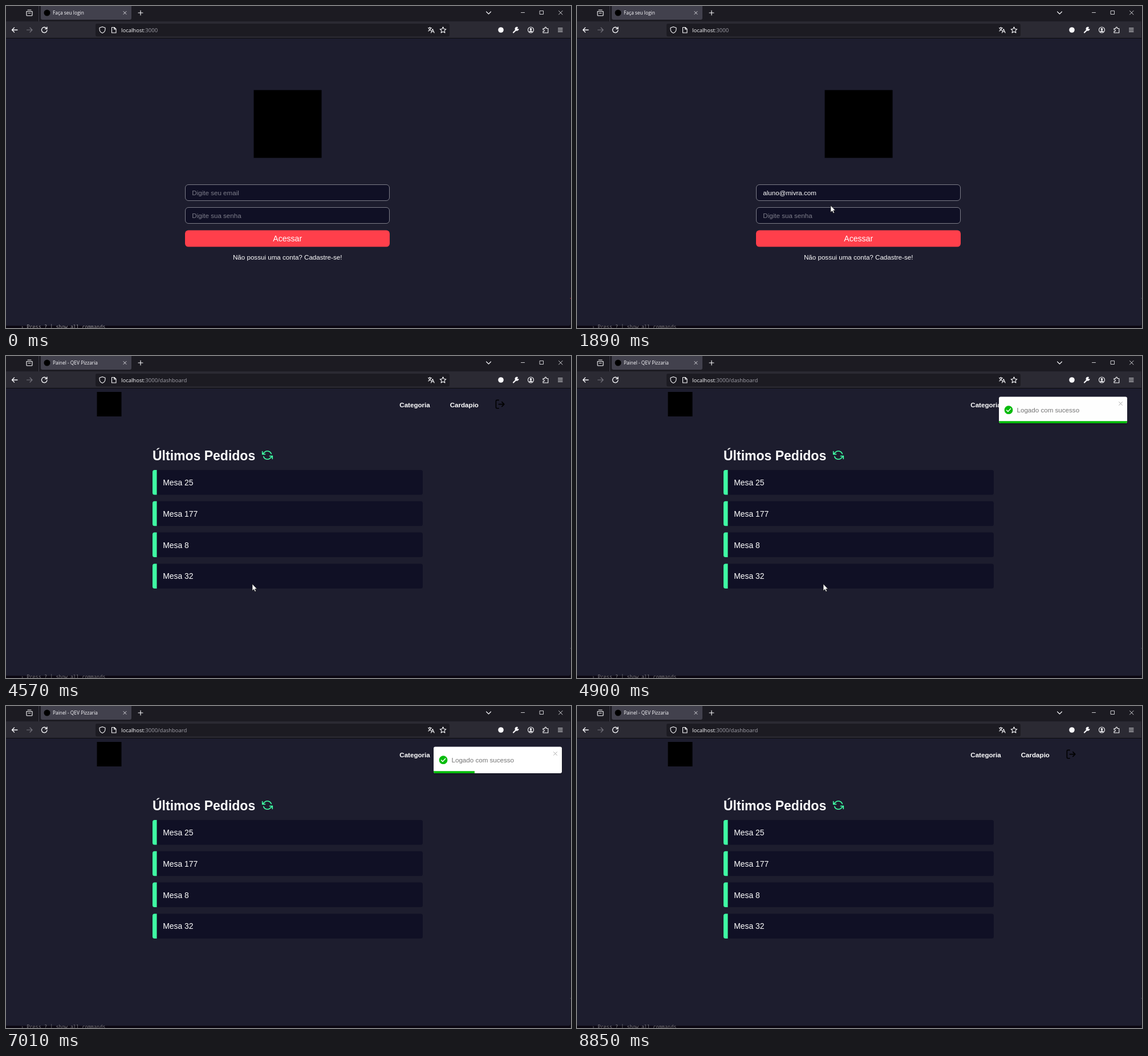
Write an HTML page that moves like this. It is 991 px wide and 565 px high and loops after 8920 ms.

```html
<!DOCTYPE html>
<html lang="pt-BR">
<head>
<meta charset="utf-8">
<title>Login</title>
<style>
html, body { margin: 0; width: 100%; height: 100%; overflow: hidden; background: #0b0711; }
svg { display: block; width: 991px; height: 565px; font: 11.6px "Liberation Sans", Arial, sans-serif; }
text { white-space: pre; }
.ui { font-family: "Open Sans", "Noto Sans", sans-serif; }
.line { fill: none; stroke: #fbfbfe; stroke-linecap: round; stroke-linejoin: round; }
.box { fill: #101025; stroke: #7c7c87; }
.white { fill: #fff; }
.hint { fill: #7d7d8a; }
.mid { text-anchor: middle; }
.bold { font-weight: bold; }
</style>
</head>
<body>
<svg viewBox="0 0 991 565">
  <rect width="991" height="565" fill="#0b0711"/>
  <path d="M990.5 0V565" stroke="#17131d"/>
  <path d="M0 56H990V558q0 3-3 3H0z" fill="#1d1d2e"/>
  <text id="shell" x="26" y="565.7" style="font:8.5px 'DejaVu Sans Mono',monospace">› Press ? │ show all commands</text>
  <path id="tick" d="M989.5 513h1.5"/>

  <g id="login">
    <rect x="434.5" y="147.5" width="119" height="119"/>
    <rect class="box" x="314.5" y="313.5" width="358" height="28" rx="5.5"/>
    <rect class="box" x="314.5" y="353.5" width="358" height="28" rx="5.5"/>
    <text id="email" x="326.3" y="332"></text>
    <text id="hint" class="hint" x="326.3" y="372">Digite sua senha</text>
    <g id="dots" class="white"></g>
    <path id="caret" stroke="#fff"/>
    <rect x="314" y="393.6" width="359" height="29" rx="5.8" fill="#ff3f4b"/>
    <text class="white mid" x="493.7" y="413.2" font-size="14.1">Acessar</text>
    <text class="white mid" x="493.7" y="445">Não possui uma conta? Cadastre-se!</text>
  </g>

  <g id="dash">
    <rect x="159.5" y="63" width="43" height="43"/>
    <g class="white bold">
      <text x="690.3" y="90.3">Categoria</text>
      <text x="778.7" y="90.3">Cardapio</text>
      <text x="257" y="182.8" font-size="23">Últimos Pedidos</text>
    </g>
    <path class="line" style="stroke:#000;stroke-width:2" transform="translate(857 75) scale(.8)"
      d="M9 21H5a2 2 0 0 1-2-2V5a2 2 0 0 1 2-2h4M16 17l5-5-5-5M21 12H9"/>
    <path class="line" style="stroke:#3fffa3;stroke-width:2" transform="translate(448.9 164.4) scale(.8)"
      d="M1 4v6h6M23 20v-6h-6M20.5 9A9 9 0 0 0 5.6 5.6L1 10M23 14l-4.6 4.4A9 9 0 0 1 3.5 15"/>
    <g id="orders"></g>
  </g>

  <g id="toast">
    <rect x="-1" y="72" width="227" height="49" rx="4" fill="#000" opacity=".12"/>
    <rect y="71.5" width="225" height="46.5" rx="3" fill="#fff"/>
    <circle cx="17" cy="94.7" r="7.4" fill="#07bc0c"/>
    <path class="line" style="stroke:#fff;stroke-width:1.5" d="M13.5 95l2.4 2.4 4.6-5"/>
    <text x="31.5" y="98.8" fill="#757575">Logado com sucesso</text>
    <path class="line" style="stroke:#aaa" d="M210.6 80.6l5.8 5.8m0-5.8l-5.8 5.8"/>
    <clipPath id="card"><rect y="71.5" width="225" height="46.5" rx="3"/></clipPath>
    <g clip-path="url(#card)"><rect id="bar" y="114.2" height="3.8" fill="#07bc0c"/></g>
  </g>

  <g id="chrome">
    <rect width="990" height="27" fill="#1c1b22"/>
    <rect y="27" width="990" height="29" fill="#2b2a33"/>
    <rect y="56" width="990" height="1" fill="#0c0c0f"/>
    <path d="M57.5 0V27" stroke="#3c3b46"/>
    <path d="M61 0H220V21q0 3-3 3H64q-3 0-3-3z" fill="#42414d"/>
    <rect x="157" y="31" width="621" height="22.5" rx="3" fill="#1c1b22"/>
    <circle cx="72" cy="12" r="5.5"/>
    <g class="ui" fill="#fbfbfe">
      <text id="title" x="82" y="15.3" font-size="8.4"></text>
      <text x="202" y="45.8" font-size="9.5">localhost<tspan id="path" fill="#a2a1aa"></tspan></text>
    </g>
    <g class="line" stroke-width="1.1">
      <path d="M38 7h6M36 9.5h10v6.5q0 1-1 1h-8q-1 0-1-1zM39 12.5h4"/>
      <path d="M232 12h8M236 8v8M842.5 10l4 4 4-4"/>
      <path d="M206 9.5l5 5m0-5l-5 5M903.5 11.5h6M936.5 8.5h6v6h-6zM969.5 8.5l6.5 6.5m0-6.5l-6.5 6.5" stroke-width=".8"/>
      <path d="M20 42h-9.5m4-4l-4 4 4 4" stroke-width="1.3"/>
      <path d="M36.5 42h9.5m-4-4l4 4-4 4" stroke="#77767f"/>
      <path d="M71.3 39.5A4.8 4.8 0 1 0 72 42.5M72 36.8v3.4h-3.4" stroke-width="1.3"/>
      <path d="M169 36.5l5 1.8v2.2q0 5-5 7-5-2-5-7v-2.2z"/>
      <path d="M185.5 37.5h4.5l3 3v6.5h-7.5zM189.7 37.5v3.3h3.3"/>
      <path d="M740.5 38.5h6m-3-1.5v1.5m2 0q-1 3.5-4.7 5.5m.8-4q1.5 2.5 4 3.3M745.5 47l2.8-6.5 2.8 6.5m-4.7-2h3.8"/>
      <path d="M766.5 36.8l1.6 3.5 3.8.4-2.9 2.5.9 3.8-3.4-2-3.4 2 .9-3.8-2.9-2.5 3.8-.4z"/>
      <path d="M890 46.5l4.5-4.5" stroke-width="2.2"/>
      <path d="M897.5 37.5a3 3 0 1 0 1.5 3l-2 .2-1-1.2z" fill="#fbfbfe"/>
      <circle cx="920.5" cy="42" r="5"/>
      <path d="M917.8 45q2.7-3 5.4 0z" fill="#fbfbfe"/>
      <circle cx="920.5" cy="40.7" r="1.3" fill="#fbfbfe"/>
      <path d="M942 39.5h3v-1a1.4 1.4 0 0 1 2.8 0v1h3v7.5h-8.8v-2.5h1a1.4 1.4 0 0 0 0-2.8h-1z"/>
      <path d="M968.5 39h7.5m-7.5 3h7.5m-7.5 3h7.5"/>
    </g>
    <circle cx="868" cy="42" r="4.8" fill="#fbfbfe"/>
  </g>

  <path id="arrow" d="M0 0V12L2.7 9.5 4.6 13.5 6.5 12.6 4.7 8.8H8.3z" fill="#fff" stroke="#111" stroke-width=".7"/>
  <path id="beam" class="line" d="M-2.5-5.5Q0-5.5 0-4.5Q0-5.5 2.5-5.5M0-5V5M-2.5 5.5Q0 5.5 0 4.5Q0 5.5 2.5 5.5"/>
</svg>
<script>
const LOOP = 8920, LOGGED_IN = 4500, TOAST_IN = 4525, BAR_START = 5227, TOAST_OUT = 7849;
const UNIT = 0.725; // page zoom
const $ = id => document.getElementById(id);
const set = (id, attrs) => { for (const k in attrs) $(id).setAttribute(k, attrs[k]); };
const show = (id, on) => set(id, { visibility: on ? 'visible' : 'hidden' });
const clamp = v => Math.min(1, Math.max(0, v));

const bezier = (x1, y1, x2, y2) => k => {
  const at = (s, p, q) => 3 * s * (1 - s) ** 2 * p + 3 * s * s * (1 - s) * q + s ** 3;
  let lo = 0, hi = 1;
  for (let i = 0; i < 22; i++) {
    const s = (lo + hi) / 2;
    if (at(s, x1, x2) < k) lo = s; else hi = s;
  }
  return at(lo, y1, y2);
};
const linear = k => k;
const bounce = bezier(.215, .61, .355, 1), ease = bezier(.25, .1, .25, 1);

// Interpolates rows of [time, ...values]
function track(rows, t, curve = linear) {
  if (t <= rows[0][0]) return rows[0].slice(1);
  const i = rows.findIndex(r => r[0] > t);
  if (i < 0) return rows[rows.length - 1].slice(1);
  const a = rows[i - 1], b = rows[i], k = curve((t - a[0]) / (b[0] - a[0]));
  return a.slice(1).map((v, j) => v + (b[j + 1] - v) * k);
}

const mouse = [
  [390, 800, 565], [1220, 470, 327], [1860, 470, 327], [1890, 445, 350],
  [2240, 423, 366], [3990, 423, 366], [4300, 432, 400], [5250, 432, 400],
  [5600, 741, 401], [5880, 837, 472], [6160, 931, 566]
];
const keys = [2720, 2860, 2990, 3260, 3330, 3400];
const slideIn = [[0, 3000, 0], [420, -25, 1], [525, 10, 1], [630, -5, 1], [700, 0, 1]];
const slideOut = [[0, 0, 1], [140, -20, 1], [700, 2000, 0]];

$('dots').innerHTML = keys.map((_, i) => `<circle cx="${330 + i * 7}" cy="368.7" r="2.8"/>`).join('');
$('orders').innerHTML = [25, 177, 8, 32].map((n, i) => {
  const y = 200 + i * 54.8;
  return `<rect x="257" y="${y}" width="474" height="43.5" rx="3.5" fill="#101025"/>
    <path d="M264.5 ${y}h-4q-3.5 0-3.5 3.5v36.5q0 3.5 3.5 3.5h4z" fill="#3fffa3"/>
    <text class="white" x="275.3" y="${y + 27}" font-size="13.9">Mesa ${n}</text>`;
}).join('');

function drawForm(t) {
  const filled = t >= 1620, typed = keys.filter(k => t >= k).length;
  $('email').textContent = filled ? 'aluno@mivra.com' : 'Digite seu email';
  set('email', { class: filled ? 'white' : 'hint' });
  set('hint', { display: typed ? 'none' : 'inline' });
  [...$('dots').children].forEach((dot, i) => dot.setAttribute('display', i < typed ? 'inline' : 'none'));
  const inEmail = t >= 1220 && t < 1620, inPassword = t >= 2240 && t < 4300;
  const x = 326.5 + (inEmail ? 0 : typed * 7);
  set('caret', {
    d: `M${x} ${inEmail ? 321.5 : 362}v12`,
    display: inEmail || inPassword ? 'inline' : 'none'
  });
}

function drawToast(t) {
  const leaving = t >= TOAST_OUT;
  const [x, opacity] = leaving ? track(slideOut, t - TOAST_OUT, ease) : track(slideIn, t - TOAST_IN, bounce);
  set('toast', { transform: `translate(${750 + x * UNIT})`, opacity });
  set('bar', { width: 225 * clamp((TOAST_OUT - t) / (TOAST_OUT - BAR_START)) });
  show('toast', t >= TOAST_IN && t < TOAST_OUT + 700);
}

function drawMouse(t) {
  const [x, y] = track(mouse, t);
  const inField = t < LOGGED_IN && x > 314 && x < 673 && ((y > 313 && y < 342) || (y > 353 && y < 382));
  const visible = t >= 390 && t < 6160 && !(t >= 2720 && t < 3750);
  for (const id of ['arrow', 'beam']) {
    set(id, { transform: `translate(${x} ${y})` });
    show(id, visible && inField === (id === 'beam'));
  }
}

function draw(now) {
  const t = now % LOOP, inside = t >= LOGGED_IN;
  set('login', { display: inside ? 'none' : 'inline' });
  set('dash', { display: inside ? 'inline' : 'none' });
  $('title').textContent = inside ? 'Painel - QEV Pizzaria' : 'Faça seu login';
  $('path').textContent = inside ? ':3000/dashboard' : ':3000';
  set('shell', { fill: t < 390 ? '#98969c' : '#77757c' });
  set('tick', { stroke: t < 390 ? '#c02030' : '#4b4950' });
  drawForm(t);
  drawToast(t);
  drawMouse(t);
  requestAnimationFrame(draw);
}
draw(performance.now());
</script>
</body>
</html>
```
